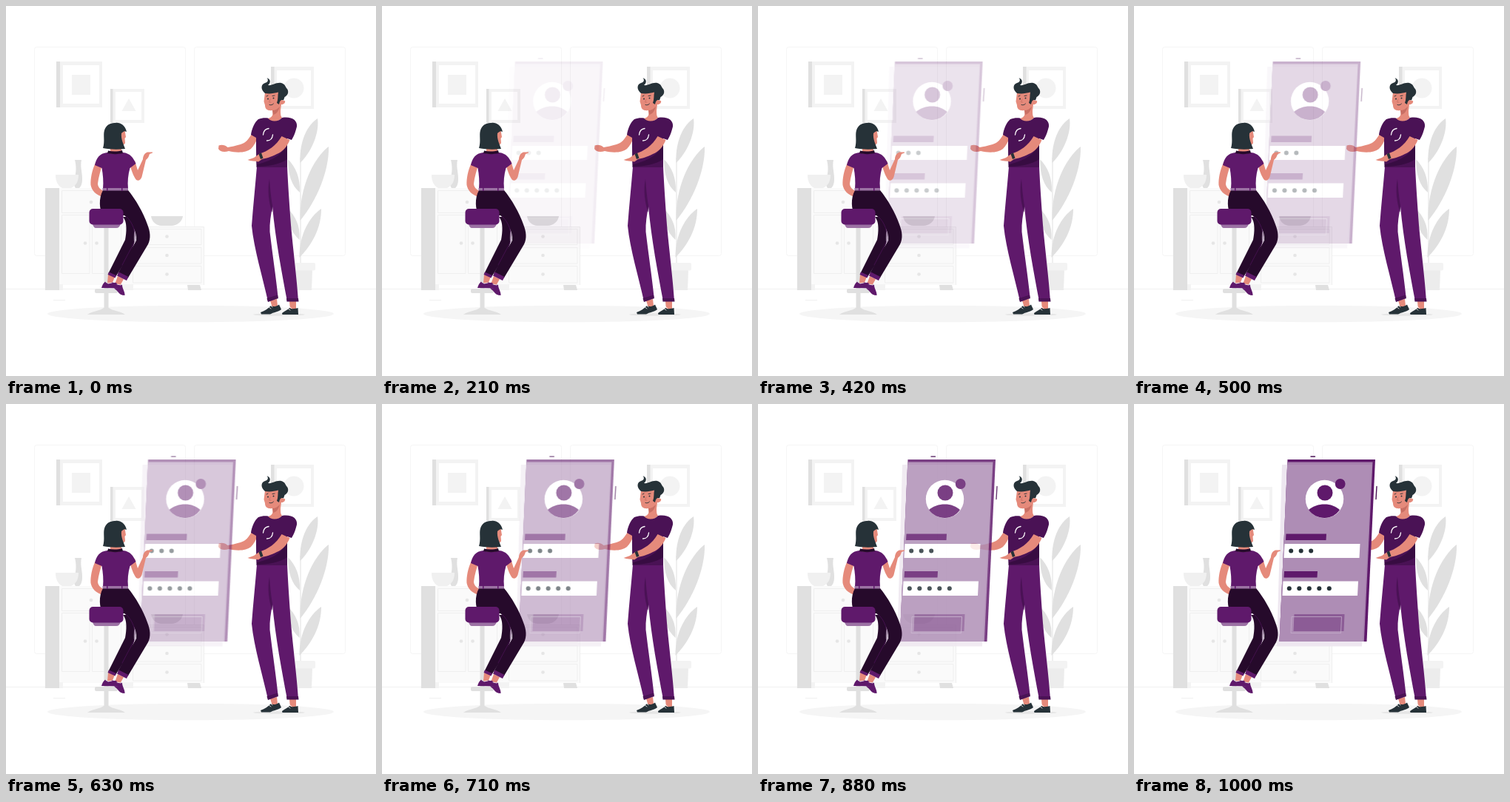
Write an HTML page that moves like this. It is 500 px wide and 500 px high and loops after 1040 ms.

```html
<!DOCTYPE html>
<html lang="en">
<head>
<meta charset="utf-8">
<title>Login scene</title>
<style>
  html, body { margin: 0; width: 100%; height: 100%; overflow: hidden; background: #fff; }
  svg { display: block; width: 100%; height: 100%; }
  .p { fill: #5f196b; }
  .deep { fill: #4a1255; }
  .night { fill: #260a2b; }
  .mid { fill: #9c72a4; }
  .skin { fill: #e58a7b; }
  .ink { fill: #263238; }
  .w { fill: #fff; }
  .g1 { fill: #fafafa; }
  .g2 { fill: #f3f3f3; }
  .g3 { fill: #e0e0e0; }
  .line { fill: none; stroke: #efefef; }
  .thin { fill: none; stroke-linecap: round; }
  #phone { opacity: 0; }
</style>
</head>
<body>
<svg viewBox="0 0 500 500">
  <!-- room -->
  <g class="line" style="stroke:#f5f5f5">
    <rect x="38.5" y="55.5" width="204" height="282" rx="3"/>
    <rect x="254.500" y="55.5" width="204" height="282" rx="3"/>
    <path d="M0 382.500H500M64 397.500H80" stroke="#f0f0f0"/>
  </g>

  <g id="pictures">
    <path class="g2" d="M72 75h58v62h-58zM144 112h43v46h-43zM362 82h54v57h-54z"/>
    <path class="g3" d="M68 75h5v62h-5zM141 112h3.500v46h-3.500zM358 82h4.500v57h-4.500z"/>
    <path class="w" d="M77 80h49v52h-49zM148 116h35v38h-35zM366 87h46v48h-46z"/>
    <path class="g2" d="M89 93h25v27h-25zM166 125l9.500 17h-19z"/>
    <circle class="g2" cx="389" cy="111" r="13.500"/>
  </g>

  <!-- plant -->
  <g class="g3">
    <path d="M397.500 212C396 182 408 160 421 152C424 172 412 198 397.500 212Z"/>
    <path d="M397.500 290C396 245 416 205 436 190C437 222 420 263 397.500 290Z"/>
    <path d="M396.500 340C396 308 411 284 426 274C426 300 414 322 396.500 340Z"/>
    <path d="M397 252C386 243 381 228 381 207C391 217 398 232 397 252Z"/>
    <path d="M396.500 316C385 306 381 292 381 274C391 284 398 297 396.500 316Z"/>
    <path d="M398 205V348" fill="none" stroke="#e0e0e0"/>
  </g>
  <path d="M388 357H414L413 384H391Z" fill="#ececec"/>
  <rect class="g2" x="384" y="347" width="34" height="10.500" rx="2"/>

  <!-- cabinets -->
  <path class="g1" d="M72 246H160V298H267.500V377H72Z"/>
  <path class="g3" d="M53 246h19v138h-19zM245 377h17l2 7h-18z"/>
  <path class="g2" d="M72 376h5v8h-5zM155 376h17v8h-17z"/>
  <path class="line" d="M75.500 249.500h80v30h-80zM75.500 282.500h37.500v79h-37.500zM116.500 282.500h39v79h-39zM171.500 301.500h92.500v21h-92.500zM171.500 326.500h92.500v21.500h-92.500zM171.500 351.500h92.500v22.500h-92.500zM160 298.500H267.500V377"/>
  <g fill="#e6e6e6">
    <circle cx="115" cy="265" r="2.300"/><circle cx="107" cy="320.500" r="2.300"/>
    <circle cx="122.500" cy="320.500" r="2.300"/><circle cx="217.500" cy="311.500" r="2.300"/>
    <circle cx="217.500" cy="337" r="2.300"/><circle cx="217.500" cy="362.500" r="2.300"/>
  </g>
  <path class="g3" d="M93 208H102C100 217 103 224 103 234C103 241 101 244 99 246H94C91 242 92 236 93 232C95 223 95 216 93 208ZM196 284H239C238 292 230 297 224 297H210C204 297 197 292 196 284Z"/>
  <path d="M67 228H98C98 238 94 243 88 246H76C70 243 67 237 67 228Z" fill="#f0f0f0"/>

  <ellipse cx="249.500" cy="416" rx="193.500" ry="11.300" fill="#f5f5f5"/>

  <!-- man -->
  <ellipse cx="369" cy="417" rx="35" ry="1.800" fill="#e6e6e6"/>
  <path class="skin" d="M357 398L366 396L367 405L360 408ZM383 399H392V410L384 411Z"/>
  <path class="ink" d="M344 414C350 412 354 409 358 405C361 407 366 406 369 403.500L372 410C369 413 361 414 357 416.500H345ZM373 415C377 412 380 411 383 408C386 410 391 409 394.500 408L395 417H373.500Z"/>
  <path class="thin" stroke="#fff" stroke-width=".8" d="M354 406l4 3M357 404l3 3M380 408l4 3M383 406l3 3"/>
  <path class="p" d="M339 217H380C381 240 383 268 385 296C388 330 393 368 395 399H380C373 362 364 315 360 271C358 282 356 293 356.500 305C360 335 365 368 367.500 393L354 399C347 367 335 328 332 297C334 269 337 242 339 217Z"/>
  <path class="deep" d="M356 234C353 248 355 265 359.500 279L360 270C358 258 357 247 356 234Z"/>
  <path class="deep" d="M352.500 395L367 390.500L368 395L354 400ZM379 395H395L395.500 399.500H379.500Z"/>

  <path class="skin" d="M333 171C328 180 324 185 317 187C310 189 305 190 299.500 191C296 188 292 187 287.500 188.500L287 193C289 197 295 198 301 196C313 199 325 198 331 193C335 189 338 183 340 178Z"/>
  <path class="skin" d="M350 117L368 115L374 128C379 126 378 133 372 133L371 141C371 146 371 149 373 151C367 158 358 158 354 152C361 150 361 146 360 141C353 142 350 139 350 134L348.500 129Z"/>
  <path fill="#c96f64" d="M360 141C364 141 367 139 370 136C368 143 365 146 361 147Z"/>
  <path class="deep" d="M341 153C346 151 350 151 354 151.500C358 157 368 157 373 151C387 149 394 155 393 163C391 171 389 176 386 181L380 179V218H338.500C338 202 338 188 338 178L331 174C332 166 336 157 341 153Z"/>
  <path fill="#380c42" d="M339 214C352 211 371 205 380 187V207C371 214 352 217 339 217Z"/>
  <path class="skin" d="M372.500 176L383.500 181C380 190 374 197 366 200C358 204 351 206 346 207L341 210.500C336 209 331 210 326.500 208L335 205L342 200C354 196 365 189 372.500 176Z"/>
  <path class="ink" d="M341.500 200L345 198.500L347.500 205.500L344 207Z"/>
  <path class="thin" stroke="#fff" stroke-width="1.300" d="M347.500 174C348 169 351 166 355 165.500M360.500 174C360 179 357 182 352.500 182"/>

  <path class="ink" d="M350 118C344 113 344 106 350 104C354 103 355 100 352.500 97C358 99 358 104 354 107C360 108 364 103 372 104C378 106 377 109 380 112C383 117 380 121 376.500 123L375 127.500C371 126 370 129 369 133L366 131C368 126 367 121 368 116.500C362 118 357 119 350 118Z"/>
  <circle class="ink" cx="354" cy="125.500" r="1"/><circle class="ink" cx="361.500" cy="124.500" r="1"/>
  <path class="thin" stroke="#263238" stroke-width=".9" d="M352 122l2-1M360 121.500l3-.5M356 133.500c2 .8 4 .2 5.500-1.500"/>
  <path class="thin" stroke="#c96f64" stroke-width=".8" d="M357 126l-1.500 4h2"/>

  <!-- handset -->
  <g id="phone">
    <path fill="#eee7f0" d="M200 82H322L308 327.500H193Z"/>
    <path class="p" d="M207.500 75H326L314.500 321H196.500Z"/>
    <path fill="#a681ae" d="M207.300 78.500H322.500L310.800 321H196.500Z"/>
    <path fill="#ae8db5" d="M207.200 82H321.500L309 321H196.500Z"/>
    <path class="thin" stroke="#4a1255" stroke-width="1.400" d="M239 71h5.500M328 111.500l-1 17"/>
    <circle class="w" cx="257.500" cy="128.500" r="25.700"/>
    <circle class="p" cx="258" cy="120" r="10.500"/>
    <path class="p" d="M236 143C242 138 249 135.500 257.500 135.500S272 138 278 143C273 150 266 154 257.500 154S241 150 236 143Z"/>
    <circle class="p" cx="278.700" cy="108" r="6.900"/>
    <path class="p" d="M205.500 175.500H260L259.500 184H205ZM203 226H248L247.500 234.500H202.500Z"/>
    <path class="w" d="M203.500 189H305.500L304.500 208H202.500ZM201.500 239.500H303L302 259H200.500Z"/>
    <g id="dots" class="ink"></g>
    <path fill="#8c5c96" d="M216.500 284H284.500L283.500 307H215.500Z"/>
    <path fill="none" stroke="#c5adcb" stroke-width=".8" d="M213 287.500H280.500L279.500 309.500H212Z"/>
  </g>

  <!-- stool and woman -->
  <path d="M110 417C117 412 127 412 132 408H139C144 412 154 412 161 417Z" fill="#e0e0e0"/>
  <rect class="g3" x="132.500" y="299" width="6" height="112"/>
  <path class="skin" d="M138 363L147 366L143 376L137 374ZM151 365L159 369L153 380L147 376Z"/>
  <rect class="g3" x="120" y="382" width="31" height="6" rx="2"/>
  <path class="p" d="M129 381C130 377 132 374 134 372.500C136 376 140 375 143 373.500C148 373 150 378 153 381.500ZM143 377C145 373.500 148 373 150 375C152 378 155 376 157 377C157 382 161 386 160.500 391C156 391 153 389 151 386C149 383 145 382 143 377Z"/>
  <path class="thin" stroke="#fff" stroke-width=".8" d="M138 375l5-1M150 376l5 1"/>

  <path class="skin" d="M121 212C116 222 114 234 114.500 242C116 250 122 255 130 258L133 251C127 248 124 244 124 240C125 231 128 222 130 215Z"/>
  <path class="skin" d="M167 212C169 221 172 230 176 235C179 237 182 235 183.500 231L189 208C192 206 193 203 194 200L198 198.500V197.500H191C187 199 185 203 185 207L178 222L174 209Z"/>
  <path class="night" d="M140 285L158 285C164 291 163 306 161 316L138.500 361L148.500 365.500C157 351 168 337 173 321L174 285Z"/>
  <path class="night" d="M131 249H165C175 261 186 280 191 295C195 305 196 314 192 322L164.500 368L151 361.500L176 317C177 304 169 290 160 283H131C126 275 125 260 131 249Z"/>
  <path class="thin" stroke="#4a1255" stroke-width=".8" d="M162 284C171 292 176 305 174 318L157 350"/>
  <path class="p" d="M139 359.500L149 364L147.500 367.500L137.500 363ZM152.500 359.500L165.500 366L163 371L150 364.500Z"/>

  <path class="skin" d="M141 190H156V199C151 203 144 202 141 199Z"/>
  <path class="p" d="M137 198C142 200 152 200 158 198C168 199 172 205 175.500 213L167.500 219C165 228 164 237 165 247H131C132 237 131 228 129.500 219L120 215C122 206 126 199 137 198Z"/>
  <path class="night" d="M138 195.500C144 197 151 197 157 195L158 199C151 200.500 144 200.500 137 199Z"/>
  <rect class="mid" x="130.500" y="246" width="34.500" height="3.500"/>
  <path class="p" d="M136 245.500h1.500v4.500h-1.500zM156 245.500h1.500v4.500h-1.500z"/>

  <path class="skin" d="M153 168H160.500L162 177L160.500 179L161 185C160 188 157 188 153 187Z"/>
  <path class="ink" d="M131 192C134 183 131 174 133 168C135 161 141 157.500 148 158C154 157 161 161 163 170C160 168 158 170 156 172C155 180 159 187 161 193C151 194 141 194 131 192Z"/>

  <path class="mid" d="M117 294H155C154 298 152 300 149 300H122C119 300 118 298 117 294Z"/>
  <rect class="p" x="112.500" y="274" width="46" height="21.500" rx="5"/>
</svg>

<script>
  const LOOP = 1040, FPS = 24, FIRST = 4, LAST = 24, TRAVEL = 30;

  // cubic-bezier(.42, 0, 1, 1), solved for x by bisection
  function easeIn(x) {
    let lo = 0, hi = 1;
    for (let i = 0; i < 30; i++) {
      const s = (lo + hi) / 2;
      if (1.26 * s + 0.48 * s * s - 0.74 * s ** 3 < x) lo = s; else hi = s;
    }
    return 3 * lo * lo - 2 * lo ** 3;
  }

  function pose(step) {
    const p = easeIn(Math.min(1, (step + 0.5) / LAST));
    return {
      offset: Math.round(step * 100 / FPS) * 10 / LOOP,
      opacity: p,
      transform: `translateX(${(p - 1) * TRAVEL}px)`,
      easing: 'step-end'
    };
  }

  function dotRow(x, y, count) {
    return Array.from({ length: count }, (_, i) =>
      `<circle cx="${x + i * 13.5}" cy="${y}" r="3"/>`).join('');
  }
  document.getElementById('dots').innerHTML = dotRow(212.2, 198.5, 3) + dotRow(209.8, 249.3, 5);

  const steps = [{ ...pose(0), opacity: 0 }];
  for (let k = FIRST; k <= LAST; k++) steps.push(pose(k));
  steps.push({ ...pose(LAST), offset: 1 });
  document.getElementById('phone').animate(steps, { duration: LOOP, iterations: Infinity });
</script>
</body>
</html>
```
